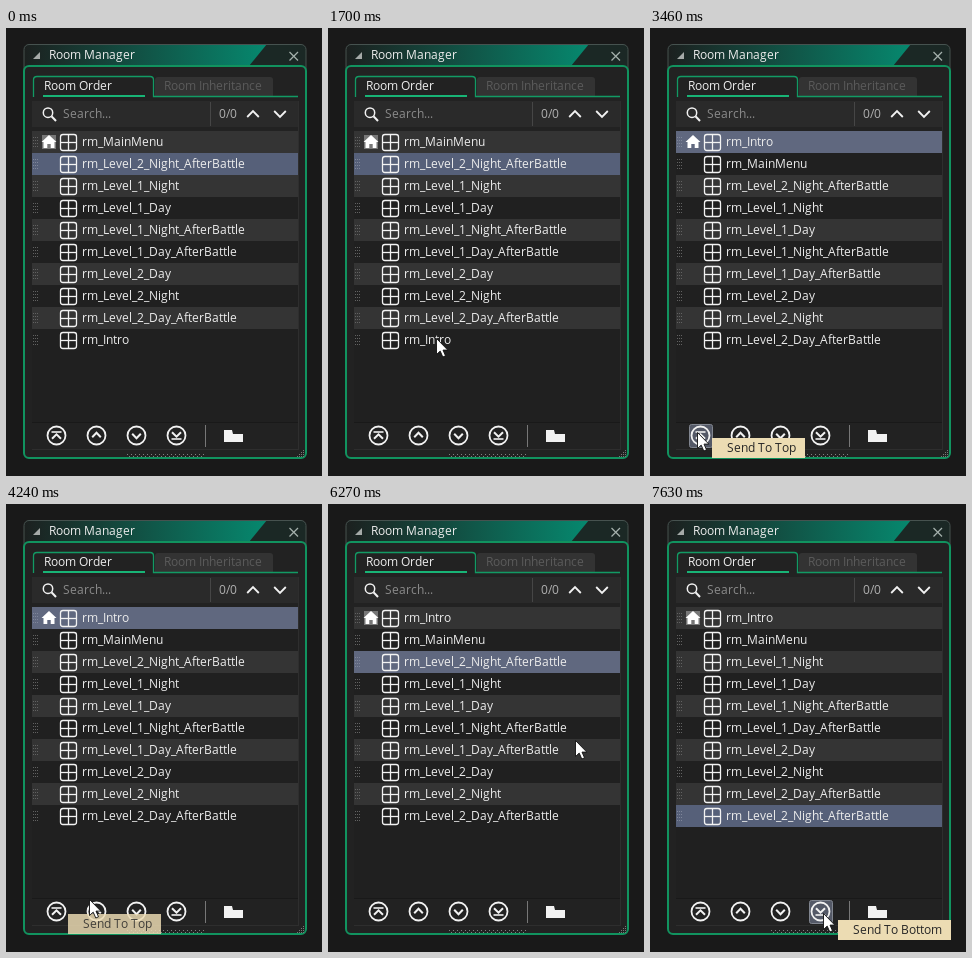
Recreate the animation shown at these times as an HTML page with a canvas. Size 316 by 448 pixels, loop 8 s.

```html
<!DOCTYPE html>
<html lang="en">
<head>
<meta charset="utf-8">
<title>Room Manager</title>
<style>
html, body { margin: 0; width: 100%; height: 100%; overflow: hidden; background: #191919; }
canvas { display: block; width: 316px; height: 448px; }
</style>
</head>
<body>
<canvas id="stage"></canvas>
<script>
const W = 316, H = 448, LOOP = 8000;
const canvas = document.getElementById('stage');
const ctx = canvas.getContext('2d');
const dpr = window.devicePixelRatio || 1;
canvas.width = W * dpr;
canvas.height = H * dpr;

const WHITE = '#f2f2f2', GREEN = '#11935f';
const INTRO = 'rm_Intro', BATTLE = 'rm_Level_2_Night_AfterBattle';
const ROOMS = ['rm_MainMenu', BATTLE, 'rm_Level_1_Night', 'rm_Level_1_Day',
  'rm_Level_1_Night_AfterBattle', 'rm_Level_1_Day_AfterBattle', 'rm_Level_2_Day',
  'rm_Level_2_Night', 'rm_Level_2_Day_AfterBattle', INTRO];
const without = (list, item) => list.filter(x => x !== item);
const SENT_TOP = [INTRO, ...without(ROOMS, INTRO)];
const SENT_BOTTOM = [...without(SENT_TOP, BATTLE), BATTLE];

// Pointer moves: first and last step time, step count, ease-out power, cubic path
const MOVES = [
  { from: 740, to: 1520, n: 10, pow: 1.5, path: [[190, 460], [220, 350], [170, 315], [108, 310]] },
  { from: 2130, to: 2850, n: 9, pow: 1.4, path: [[108, 310], [150, 340], [110, 400], [47, 404]] },
  { from: 4240, to: 4990, n: 10, pow: 1.6, path: [[47, 404], [129, 395], [182, 321], [207, 183]] },
  { from: 5080, to: 5350, n: 4, pow: 1.3, path: [[207, 183], [206, 173], [204, 163], [202, 153]] },
  { from: 6090, to: 6810, n: 9, pow: 1.475, path: [[202, 153], [269, 197], [261, 280], [180, 401]] },
  { from: 6900, to: 6990, n: 2, pow: 1, path: [[180, 401], [178, 404], [175, 407], [173, 409]] }
];
const TIPS = [
  { text: 'Send To Top', from: 3310, to: 4330, leave: 4240, x: 62, y: 410, w: 93 },
  { text: 'Send To Bottom', from: 7360, to: LOOP, leave: LOOP, x: 188, y: 416, w: 113 }
];

function bezier(p, u) {
  const v = 1 - u;
  return [0, 1].map(i => v * v * v * p[0][i] + 3 * v * v * u * p[1][i] +
    3 * v * u * u * p[2][i] + u * u * u * p[3][i]);
}

function pointerAt(t) {
  let move = null;
  for (const m of MOVES) if (t >= m.from) move = m;
  if (!move) return null;
  const gap = (move.to - move.from) / (move.n - 1);
  const step = Math.min(move.n, Math.floor((t - move.from) / gap + 0.08) + 1);
  return bezier(move.path, 1 - Math.pow(1 - step / move.n, move.pow));
}

function stateAt(t) {
  return {
    rooms: t < 3400 ? ROOMS : t < 7450 ? SENT_TOP : SENT_BOTTOM,
    selected: t < 1790 ? BATTLE : t < 5530 ? INTRO : BATTLE,
    hover: t >= 2850 && t < 4240 ? 50 : t >= 6810 ? 170 : 0
  };
}

function rect(x, y, w, h, color) {
  ctx.fillStyle = color;
  ctx.fillRect(x, y, w, h);
}

function trace(points, closed) {
  ctx.beginPath();
  points.forEach(([x, y], i) => i ? ctx.lineTo(x, y) : ctx.moveTo(x, y));
  if (closed) ctx.closePath();
}

function line(points, color, width) {
  trace(points);
  ctx.strokeStyle = color;
  ctx.lineWidth = width;
  ctx.stroke();
}

function shape(points, color) {
  trace(points, true);
  ctx.fillStyle = color;
  ctx.fill();
}

function box(x, y, w, h, r, fill, stroke, width = 1) {
  ctx.beginPath();
  ctx.roundRect(x, y, w, h, r);
  if (fill) { ctx.fillStyle = fill; ctx.fill(); }
  if (stroke) { ctx.strokeStyle = stroke; ctx.lineWidth = width; ctx.stroke(); }
}

function ring(x, y, r, color, width) {
  ctx.beginPath();
  ctx.arc(x, y, r, 0, Math.PI * 2);
  ctx.strokeStyle = color;
  ctx.lineWidth = width;
  ctx.stroke();
}

// Glyphs sit on whole pixels, as in a bitmap font
function label(text, x, y, color = '#ececec') {
  ctx.font = '12px "Open Sans", "Noto Sans", sans-serif';
  ctx.fillStyle = color;
  for (const ch of text) {
    ctx.fillText(ch, x, y);
    x += Math.round(ctx.measureText(ch).width);
  }
}

// dir is 1 for a chevron pointing down, -1 for up
function chevron(x, y, w, h, dir, width = 2) {
  line([[x - w, y - h * dir], [x, y + h * dir], [x + w, y - h * dir]], WHITE, width);
}

function drawTitle() {
  box(18, 16.5, 282, 30, 5, '#1b2825');
  const glow = ctx.createLinearGradient(18, 0, 260, 0);
  glow.addColorStop(0, '#1c201f');
  glow.addColorStop(1, '#06886e');
  ctx.save();
  ctx.clip();
  shape([[18, 16], [261, 16], [243, 38], [18, 38]], glow);
  ctx.restore();
  box(18, 16.5, 282, 30, 5, null, '#46524f');
  shape([[34, 24], [34, 31], [27, 31]], '#a5aaa8');
  label('Room Manager', 43, 31);
  line([[283.5, 24], [292, 32.5]], '#a4b0ac', 1.3);
  line([[292, 24], [283.5, 32.5]], '#a4b0ac', 1.3);
}

function drawTabs() {
  box(149, 49, 118, 19, [3, 3, 0, 0], '#333333');
  label('Room Inheritance', 158, 62, '#5b5b5b');
  ctx.beginPath();
  ctx.moveTo(27.5, 69);
  ctx.lineTo(27.5, 52);
  ctx.quadraticCurveTo(27.5, 48.5, 31, 48.5);
  ctx.lineTo(144, 48.5);
  ctx.quadraticCurveTo(147.5, 48.5, 147.5, 52);
  ctx.lineTo(147.5, 68.5);
  ctx.lineTo(292, 68.5);
  ctx.strokeStyle = '#129a64';
  ctx.lineWidth = 1.3;
  ctx.stroke();
  label('Room Order', 38, 62);
  rect(37, 67, 102, 2, '#18b476');
}

function drawSearch() {
  rect(26, 73, 266, 26, '#2a2a2a');
  ring(42, 84.7, 4.7, WHITE, 1.5);
  line([[45.5, 88.2], [50, 93]], WHITE, 2);
  label('Search...', 57, 90, '#8b8b8b');
  rect(204, 74, 1, 24, '#464646');
  label('0/0', 213, 90, '#b0b0b0');
  chevron(247, 86, 5.8, 3, -1, 1.8);
  chevron(274, 86, 5.8, 3, 1, 1.8);
}

function drawHome(y, boxed) {
  if (boxed) rect(36, y - 7, 14, 14, '#777777');
  shape([[43, y - 7], [50.5, y], [48.5, y], [48.5, y + 6], [44.7, y + 6], [44.7, y + 2],
    [41.3, y + 2], [41.3, y + 6], [37.5, y + 6], [37.5, y], [35.5, y]], '#ffffff');
}

function drawRow(name, i, selected) {
  const top = 103 + i * 22, mid = top + 11, even = i % 2 === 0;
  const color = selected ? (even ? '#60687f' : '#566079') : even ? '#343434' : '#202020';
  rect(26, top, 266, 22, color);
  for (let k = 0; k < 4; k++)
    for (let d = 0; d < 3; d++)
      rect(27 + d * 2, top + 6 + k * 3, 1, 1, selected ? '#7f869a' : '#626262');
  if (i === 0) drawHome(mid, !selected);
  box(54.5, mid - 7.5, 16, 16, 2.5, null, WHITE, 1.3);
  line([[62.5, mid - 7], [62.5, mid + 8]], WHITE, 1.3);
  line([[55, mid + 0.5], [70, mid + 0.5]], WHITE, 1.3);
  label(name, 76, mid + 4);
}

function drawToolbar(hover) {
  const y = 408;
  if (hover) box(hover - 10.5, y - 11.5, 23, 23, 2, '#545967', '#80858f');
  for (const x of [50, 90, 130, 170]) ring(x + 0.5, y - 0.5, 9, WHITE, 1.8);
  line([[45.5, 404], [55.5, 404]], WHITE, 1.6);
  chevron(50.5, 408.5, 4.5, 2.2, -1);
  chevron(90.5, 407, 4.3, 2.2, -1);
  chevron(130.5, 408, 4.3, 2.2, 1);
  chevron(170.5, 406.5, 4.5, 2.2, 1);
  line([[165.5, 411], [175.5, 411]], WHITE, 1.6);
  rect(199, 397, 1, 22, '#777777');
  shape([[218, 402], [226, 402], [227, 406], [237, 406], [237, 414], [218, 414]], WHITE);
}

function drawGrips() {
  for (let x = 121; x < 198; x += 2) rect(x, x % 4 === 1 ? 426 : 428, 1, 1, '#808080');
  for (let a = 0; a < 4; a++)
    for (let b = 0; b <= a; b++) rect(297 - b * 2, 422 + a * 2, 1, 1, '#777777');
}

function drawTip(tip, t) {
  if (t < tip.from || t >= tip.to) return;
  const shown = Math.min(1, (Math.floor((t - tip.from) / 75) + 1) / 3);
  ctx.globalAlpha = t >= tip.leave ? 0.84 : shown;
  rect(tip.x, tip.y, tip.w, 20, '#ecdcb3');
  label(tip.text, tip.x + 15, tip.y + 14, '#262626');
  ctx.globalAlpha = 1;
}

function drawPointer(pos) {
  if (!pos) return;
  ctx.save();
  ctx.translate(Math.round(pos[0]) + 0.5, Math.round(pos[1]) + 0.5);
  trace([[0, 0], [0, 16], [3.7, 12.6], [6.3, 18.5], [9, 17.3], [6.5, 11.6], [11.3, 11.6]], true);
  ctx.fillStyle = '#ffffff';
  ctx.fill();
  ctx.strokeStyle = '#111111';
  ctx.lineWidth = 0.9;
  ctx.stroke();
  ctx.restore();
}

function draw(t) {
  const state = stateAt(t);
  ctx.setTransform(dpr, 0, 0, dpr, 0, 0);
  rect(0, 0, W, H, '#191919');
  drawTitle();
  box(18, 38, 282, 392, 5, '#222222', GREEN, 2);
  drawTabs();
  drawSearch();
  rect(26, 103, 266, 291, '#202020');
  state.rooms.forEach((name, i) => drawRow(name, i, name === state.selected));
  rect(26, 394, 266, 1, '#191919');
  rect(292, 73, 1, 349, '#2e2e2e');
  rect(26, 421, 267, 1, '#2e2e2e');
  drawToolbar(state.hover);
  drawGrips();
  TIPS.forEach(tip => drawTip(tip, t));
  drawPointer(pointerAt(t));
}

const start = performance.now();
function tick() {
  draw((performance.now() - start) % LOOP);
  requestAnimationFrame(tick);
}
tick();
</script>
</body>
</html>
```
